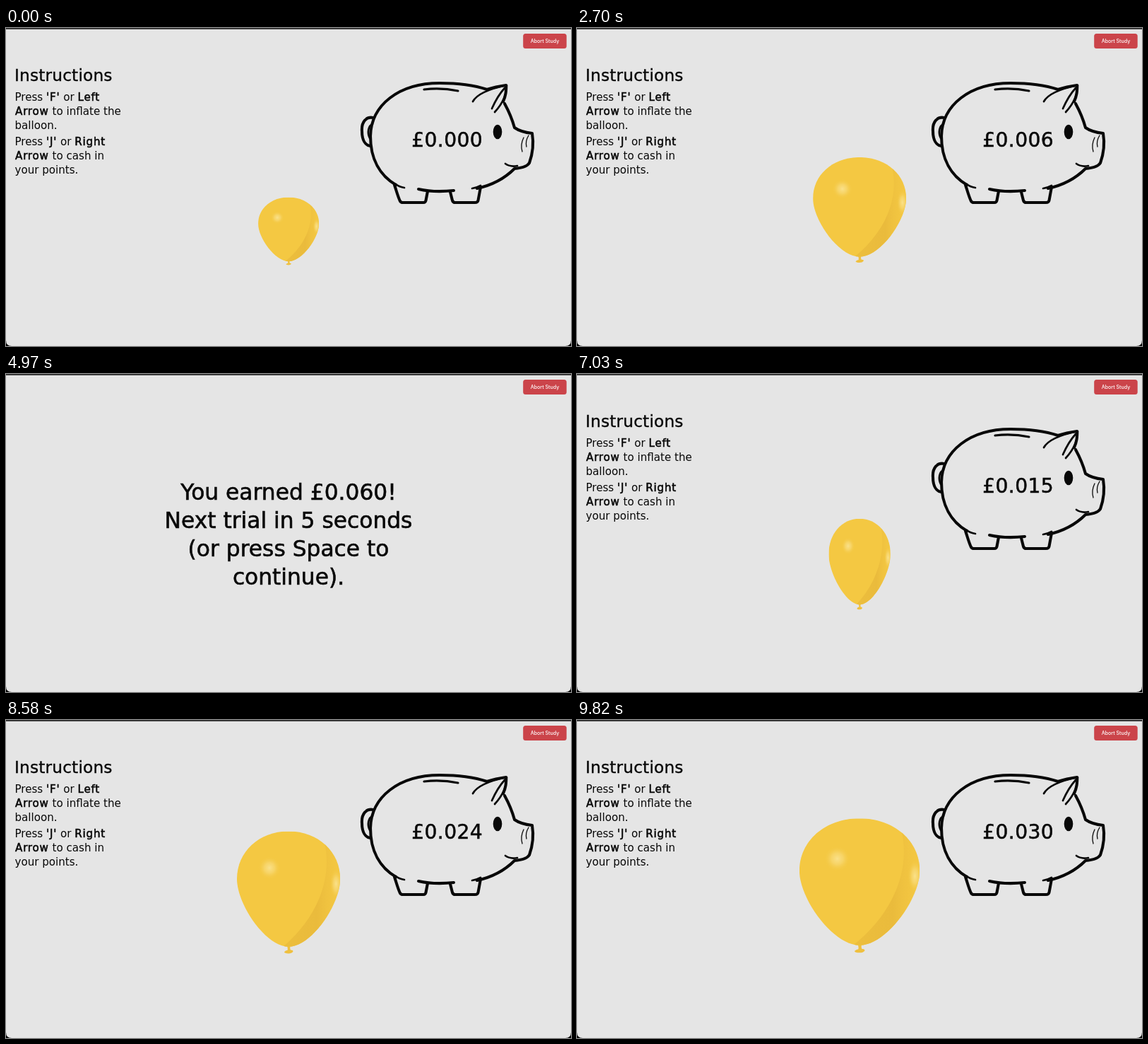
Recreate the animation shown at these times as an HTML page. Size 800 by 450 pixels, loop 9880 ms.

```html
<!DOCTYPE html>
<html lang="en">
<head>
<meta charset="utf-8">
<title>Balloon task</title>
<style>
  html, body { margin: 0; width: 100%; height: 100%; overflow: hidden; background: #000; }
  svg { display: block; width: 800px; height: 450px; }
  text { font-family: "DejaVu Sans", sans-serif; fill: #080808; stroke: #080808; stroke-width: 0; }
  .head { font-size: 23.3px; letter-spacing: .15px; stroke-width: .35px; }
  .body { font-size: 15.1px; }
  .body tspan { stroke-width: .55px; letter-spacing: .8px; }
  .amount { font-size: 28.2px; letter-spacing: .4px; stroke-width: .5px; text-anchor: middle; }
  .message text { font-size: 31.3px; stroke-width: .6px; text-anchor: middle; }
  .button { font: 500 7.1px Inter, sans-serif; fill: #fff; stroke: none; text-anchor: middle; }
  .pig { fill: none; stroke: #080808; stroke-width: 4.1; stroke-linecap: round; stroke-linejoin: round; }
  .pig .thin { stroke-width: 1.3; }
  .pig .mid { stroke-width: 2.7; }
</style>
</head>
<body>
<svg viewBox="0 0 800 450">
  <defs>
    <radialGradient id="glow">
      <stop offset="0" stop-color="#fae18a"/>
      <stop offset=".45" stop-color="#f8d872" stop-opacity=".75"/>
      <stop offset="1" stop-color="#f4c842" stop-opacity="0"/>
    </radialGradient>
    <linearGradient id="shade" x1="0" y1="0" x2="1" y2="0">
      <stop offset="0" stop-color="#ecbe3d"/>
      <stop offset=".6" stop-color="#eabb3c"/>
      <stop offset="1" stop-color="#f2c541" stop-opacity=".2"/>
    </linearGradient>
    <clipPath id="skin">
      <path d="M0 0C29 0 50 17 50 39C50 60 22 94.5 0 94.5C-22 94.5-50 60-50 39C-50 17-29 0 0 0Z"/>
    </clipPath>
  </defs>

  <rect width="800" height="450" fill="#060606"/>
  <path d="M0 1.5H800V442Q800 450 792 450H8Q0 450 0 442Z" fill="#e5e5e5"/>
  <rect width="800" height="1.5" fill="#2b2b2b"/>

  <g id="trial">
    <text class="head" x="12" y="75">Instructions</text>
    <g class="body">
      <text x="12.5" y="103">Press <tspan>'F'</tspan> or <tspan>Left</tspan></text>
      <text x="13" y="123"><tspan>Arrow</tspan> to inflate the</text>
      <text x="12.5" y="143">balloon.</text>
      <text x="12.5" y="165.5">Press <tspan>'J'</tspan> or <tspan>Right</tspan></text>
      <text x="13" y="185.5"><tspan>Arrow</tspan> to cash in</text>
      <text x="12.5" y="205.5">your points.</text>
    </g>

    <g class="pig">
      <path d="M681 87C660 80 638 78 614 78C556 78 517 109 516 153C516 186 530 209 552 222"/>
      <path d="M520 127C510 125 503 133 504 146C504 159 509 166 516 167"/>
      <path class="mid" d="M519 136C513 138 511 148 515 156"/>
      <path d="M550 222C553 231 555 239 558 245Q559 247 562 247H591Q594 247 594.5 244L597 231"/>
      <path d="M584 228Q606 233 634 230"/>
      <path d="M629 232L632 244Q633 247 636 247H664Q668 247 668.5 244L672 225"/>
      <path class="mid" d="M552 221Q557 225 564 226M660 227Q667 226 672 223"/>
      <path d="M667 227C690 222 707 212 720 199C731 198 738 196 741 191C746 177 747 161 745 149C736 148 727 146 720 141C717 130 712 118 706 107"/>
      <path class="mid" d="M661 104C666 95 680 87 709 81C709 94 703 107 692 119"/>
      <path d="M681 87Q693 83 708 81Q709 93 704 104"/>
      <path class="mid" d="M706 85Q696 96 688 114"/>
      <path d="M592 87Q616 84 640 89" stroke-width="3.2"/>
      <path class="mid" d="M707 192Q714 197 724 195"/>
      <path class="thin" d="M733 155Q728 165 731 175M740 152Q735 160 737 168"/>
      <ellipse cx="696" cy="147" rx="6.3" ry="10.3" fill="#080808" stroke="none"/>
    </g>
    <text class="amount" id="amount" x="624.7" y="167.5">£0.000</text>

    <g id="balloon">
      <path d="M-1.8 93H2Q1 96 2 97.2Q4.5 97 4.3 98.5Q3 100 0 100Q-4 100-4.2 98.8Q-3 97.5-1 97.3Q-.5 96-1.8 93Z" fill="#efc03e"/>
      <g clip-path="url(#skin)">
        <rect x="-50" width="100" height="95" fill="#f4c842"/>
        <path d="M35 10C42 38 29 70-6 95H20L50 60V25Q43 15 35 10Z" fill="url(#shade)"/>
        <ellipse cx="46" cy="43" rx="6" ry="12" fill="url(#glow)"/>
      </g>
      <ellipse cx="-18.5" cy="30" rx="11" ry="9.5" fill="url(#glow)"/>
    </g>
  </g>

  <g id="message" class="message">
    <text x="400" y="177.5">You earned £0.060!</text>
    <text x="400" y="217.5">Next trial in 5 seconds</text>
    <text x="400" y="257.5">(or press Space to</text>
    <text x="400" y="297.5">continue).</text>
  </g>

  <rect x="732.2" y="8" width="61.5" height="21" rx="3.5" fill="#cb444a"/>
  <text class="button" x="763" y="21">Abort Study</text>
</svg>

<script>
  const LOOP = 9880, CASH_IN = 4970, NEXT = 6210;
  const heights = [96, 128.5, 149, 163, 173, 182, 190];
  const ASPECT = 0.897;

  // Each pump is [start, duration]: the balloon grows taller first, then wider.
  const rounds = [
    [[820, 900], [1880, 900], [3000, 730], [4120, 650]],
    [[6560, 780], [7290, 650], [7830, 650], [8230, 640], [8590, 590], [9200, 610]]
  ];

  const get = id => document.getElementById(id);
  const trial = get('trial'), message = get('message');
  const balloon = get('balloon'), amount = get('amount');

  const ease = x => {
    const p = Math.min(1, Math.max(0, x));
    return (1 - Math.cos(Math.PI * p)) / 2;
  };

  function draw(t) {
    const paused = t >= CASH_IN && t < NEXT;
    trial.style.display = paused ? 'none' : '';
    message.style.display = paused ? '' : 'none';
    if (paused) return;

    const round = t < CASH_IN ? 0 : 1;
    let tall = heights[0], wide = heights[0];
    let points = round * 12;
    rounds[round].forEach(([start, length], i) => {
      const p = (t - start) / length;
      const step = heights[i + 1] - heights[i];
      tall += step * ease(p / 0.54);
      wide += step * ease((p - 0.54) / 0.46);
      if (p >= 0.5) points += 3;
    });

    const sx = wide * ASPECT / 100, sy = tall / 100;
    balloon.setAttribute('transform',
      `translate(400.1 ${341.8 - 1.066 * tall}) scale(${sx} ${sy})`);
    amount.textContent = '£' + (points / 1000).toFixed(3);
  }

  const origin = performance.now();
  function tick() {
    draw((performance.now() - origin) % LOOP);
    requestAnimationFrame(tick);
  }
  tick();
</script>
</body>
</html>
```
